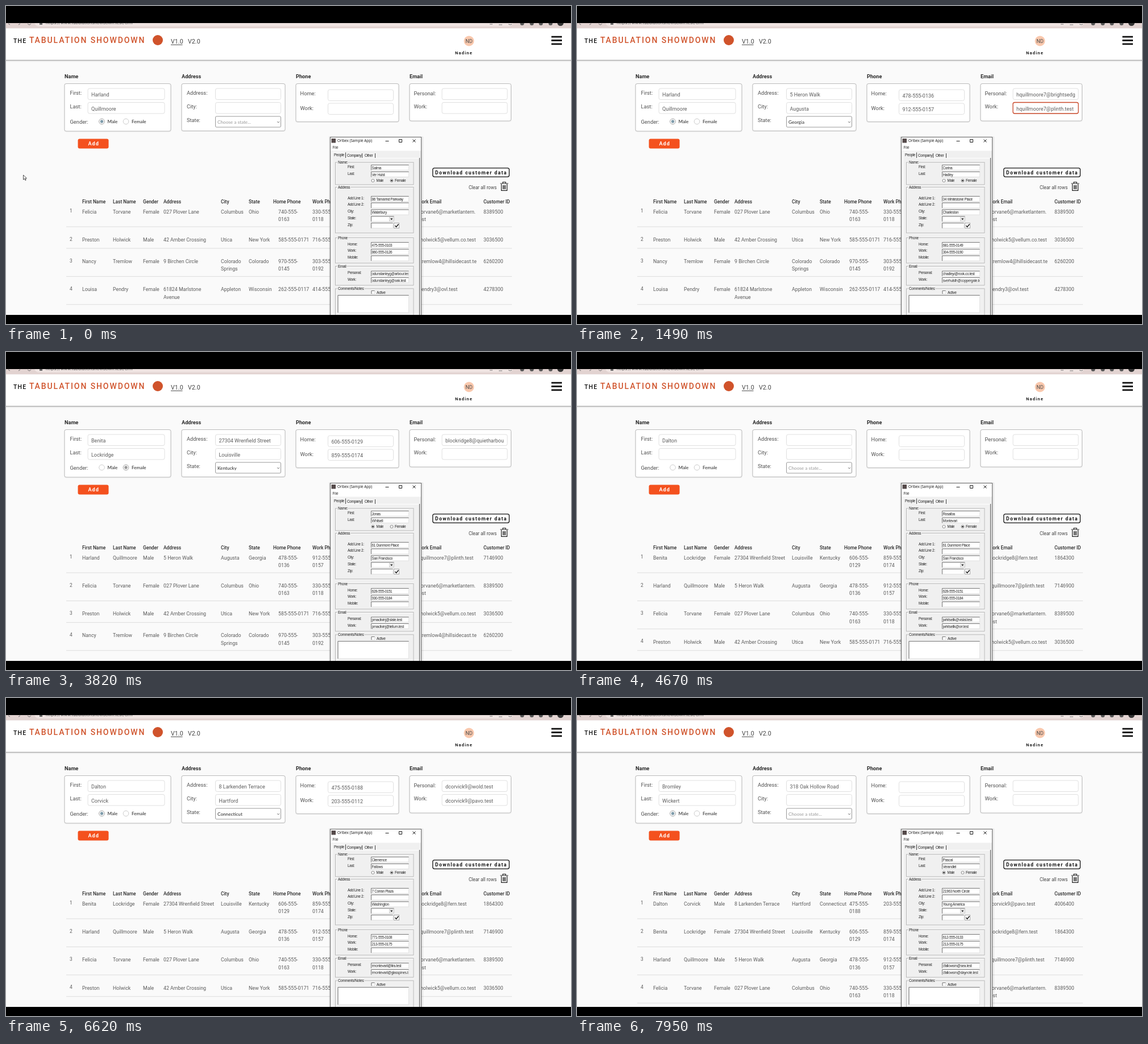
These frames come from a looping animation (994 px wide and 559 px high, 8 s). An HTML page:

```html
<!DOCTYPE html>
<html lang="en">
<head>
<meta charset="utf-8">
<title>Form filling</title>
<style>
html, body { margin: 0; width: 100%; height: 100%; overflow: hidden; background: #000; }
#stage { display: block; width: 100vw; height: 100vh; }
text { font: 9.2px Roboto, sans-serif; fill: #444; white-space: pre; }
.brand { font-size: 14px; font-weight: 500; letter-spacing: 1.9px; fill: #d0532b; }
.the { font-size: 10.5px; font-weight: 500; letter-spacing: 1.2px; fill: #111; }
.version { font-size: 10.7px; }
.user { font-size: 7.5px; font-weight: 600; letter-spacing: 1.2px; fill: #222; }
.section { font-size: 9.2px; font-weight: 600; fill: #2a2a2a; }
.label { font-size: 9.3px; fill: #505050; }
.value { font-size: 9px; fill: #5c5c5c; }
.lato { font: 8.2px Lato, sans-serif; fill: #222; }
.hint { fill: #999; }
.add { font-size: 9px; font-weight: 700; letter-spacing: 1px; fill: #fff; }
.download { font-size: 8.6px; font-weight: 600; letter-spacing: 1.4px; fill: #111; }
.clear { font-size: 8.2px; }
.head { font-size: 8.4px; font-weight: 500; fill: #2a2a2a; }
.cell { font-size: 8.8px; fill: #5c5c5c; }
.num { font-size: 8.4px; fill: #5c5c5c; }
.title { font: 6.4px "Open Sans", sans-serif; fill: #111; }
.app { font: 6.4px "Liberation Sans", sans-serif; letter-spacing: -.33px; fill: #222; }
.url { font-size: 8px; fill: #555; }
</style>
</head>
<body>
<svg id="stage" viewBox="0 0 994 559" preserveAspectRatio="none">
  <g id="page"></g>
  <g id="pageData"></g>
  <g id="app"></g>
  <g id="appData"></g>
  <path d="M0 0H994V30H0zM0 543H994V559H0z"/>
</svg>
<script>
const LOOP = 8000;
const $ = id => document.getElementById(id);

const text = (x, y, s, cls, more = '') => `<text x="${x}" y="${y}" class="${cls}" ${more}>${s}</text>`;
const rect = (x, y, w, h, fill, stroke = 'none', r = 0, sw = 1) =>
  `<rect x="${x}" y="${y}" width="${w}" height="${h}" rx="${r}" fill="${fill}" stroke="${stroke}" stroke-width="${sw}"/>`;
const line = (d, stroke, w = 1) => `<path d="${d}" fill="none" stroke="${stroke}" stroke-width="${w}"/>`;
const dot = (x, y, r, fill, stroke = 'none') => `<circle cx="${x}" cy="${y}" r="${r}" fill="${fill}" stroke="${stroke}"/>`;
const clipped = (x, y, w, s, cls) => `<svg x="${x}" y="${y - 10}" width="${w}" height="14">${text(0, 10, s, cls)}</svg>`;

// first, last, gender, address, city, state, home, work, work mail, id, personal mail; | breaks a table line
const customers = [
  ['Louisa', 'Pendry', 'Female', '61824 Marlstone|Avenue', 'Appleton', 'Wisconsin', '262-555-0117', '414-555-0139', 'lpendry3@ovl.test', '4278300'],
  ['Nancy', 'Tremlow', 'Female', '9 Birchen Circle', 'Colorado|Springs', 'Colorado', '970-555-|0145', '303-555-|0192', 'ntremlow4@hillsidecast.te|st', '6260200'],
  ['Preston', 'Holwick', 'Male', '42 Amber Crossing', 'Utica', 'New York', '585-555-0171', '716-555-0114', 'pholwick5@vellum.co.test', '3036500'],
  ['Felicia', 'Torvane', 'Female', '027 Plover Lane', 'Columbus', 'Ohio', '740-555-|0163', '330-555-|0118', 'ftorvane6@marketlantern.|test', '8389500'],
  ['Harland', 'Quillmoore', 'Male', '5 Heron Walk', 'Augusta', 'Georgia', '478-555-|0136', '912-555-|0157', 'hquillmoore7@plinth.test', '7146900', 'hquillmoore7@brightsedge.test'],
  ['Benita', 'Lockridge', 'Female', '27304 Wrenfield Street', 'Louisville', 'Kentucky', '606-555-|0129', '859-555-|0174', 'blockridge8@fern.test', '1864300', 'blockridge8@quietharbour.test'],
  ['Dalton', 'Corvick', 'Male', '8 Larkenden Terrace', 'Hartford', 'Connecticut', '475-555-|0188', '203-555-0112', 'dcorvick9@pavo.test', '4006400', 'dcorvick9@wold.test'],
  ['Bromley', 'Wickert', 'Male', '318 Oak Hollow Road'],
];
// Times at which each form field is set, in the order of formFields, for customers 4 to 7
const formFields = [0, 1, 2, 3, 4, 5, 6, 7, 10, 8];
const forms = [
  { start: 0, at: [0, 0, 0, 240, 470, 700, 1020, 1180, 1300, 1410] },
  { start: 1810, at: [2120, 2330, 2560, 2790, 3030, 3360, 3500, 3580, 3650, 3970] },
  { start: 4390, at: [4670, 4920, 5040, 5280, 5600, 5760, 5920, 6080, 6160, 6450] },
  { start: 6850, at: [7170, 7270, 7500, 7880] },
];

// first, last, gender, address, city, home, work, personal mail, work mail
const contacts = [
  { at: [0, 0, 0, 0, 0, 0, 0, 80, 230], data: ['Salma', 'Ver Hulst', 'F', '86 Tamarind Parkway', 'Waterbury', '475-555-0103', '860-555-0126', 'sverhulsth@plum.test', 'sverhulsth@coppergate.test'] },
  { at: [400, 560, 640, 870, 1020, 1180, 1300, 1410, 1570], data: ['Corina', 'Hadley', 'F', '04 Whitestone Place', 'Charleston', '681-555-0149', '304-555-0190', 'chadleyi@rook.co.test', 'chadleyi@q.test'] },
  { at: [1720, 1890, 1890, 2120, 2330, 2560, 2640, 2790, 2870], data: ['Petra', 'MacIlvin', 'F', '30718 Lena Drive', 'Shawnee Mission', '913-555-0120', '785-555-0166', 'pmacilvinj@slate.test', 'pmacilvinj@tellum.test'] },
  { at: [3030, 3360, 3420, 3500, 3580, 3650, 3820, 3970, 4130], data: ['Jonas', 'Whitsell', 'M', '61 Dunmore Place', 'San Francisco', '628-555-0151', '930-555-0184', 'jwhitsellk@vistal.test', 'jwhitsellk@orr.test'] },
  { at: [4300, 4450, 4550, 4920, 5040, 5130, 5280, 5450, 5600], data: ['Rosalba', 'Montevari', 'F', '2790 Fairhollow Court', 'Phoenix', '480-555-0122', '623-555-0169', 'rmontevaril@lira.test', 'rmontevaril@glasspines.test'] },
  { at: [5760, 5920, 5920, 6080, 6160, 6450, 6550, 6700, 6850], data: ['Clemence', 'Fallows', 'F', '7 Corran Plaza', 'Washington', '771-555-0108', '213-555-0175', 'cfallowsm@sea.test', 'cfallowsm@daynote.test'] },
  { at: [7000, 7170, 7270, 7400, 7630, 7880], data: ['Pascal', 'Verandiel', 'M', '21963 North Circle', 'Young America', '612-555-0133'] },
];
const firstMails = { 7: 'odunstanleyg@arbour.test', 8: 'odunstanleyg@oak.test' };

const inputs = {
  0: [144, 145, 135], 1: [144, 169.5, 135],
  3: [368.5, 145, 115], 4: [368.5, 169.5, 115],
  6: [566.5, 147, 115], 7: [566.5, 171, 115],
  10: [767, 145, 115], 8: [767, 169.5, 115],
};
const columns = [134, 188, 241, 277, 378, 427, 479, 539, 724, 840];
const appTops = { 0: 279.5, 1: 291.5, 3: 334.5, 4: 358, 5: 415.5, 6: 427.5, 7: 466, 8: 477.5 };

function drawPage() {
  let s = rect(0, 30, 994, 513, '#fafafa') + rect(0, 30, 994, 9.5, '#e2d3d1') + rect(50, 20, 842, 16, '#eee3e1', 'none', 8)
    + text(70, 32, 'https://www.tabulationshowdown.test/crm', 'url')
    + line('M4 31l3 2M22 33l3 -2M38 31q3 4 6 0', '#666') + rect(59, 28, 5, 5, '#666')
    + line('M851 32h5M867 33h6M884 32l3 1 3 -1', '#777');
  for (const x of [908, 925, 941, 958]) s += dot(x, 30.5, 3.5, '#555');
  s += dot(975.5, 29.5, 5.5, '#333');
  // header
  s += rect(0, 39.5, 994, 56, '#fff') + line('M0 95.5H994', '#aaa', 1.3) + line('M0 97H994', '#e6e6e6', 1.5)
    + text(13, 64.5, 'THE', 'the') + text(41, 65, 'TABULATION SHOWDOWN', 'brand') + dot(267, 60, 9, '#d0532b')
    + text(290, 66, 'V1.0', 'version') + line('M290 68.2H310.5', '#444') + text(320, 66, 'V2.0', 'version')
    + dot(814.5, 61.5, 9, '#f9c8ad') + text(814.5, 64.7, 'ND', 'label', 'text-anchor="middle"') + text(790, 85, 'Nadine', 'user')
    + line('M959.5 54.2H978M959.5 60.5H978M959.5 66.8H978', '#111', 2.8);
  // form panels
  for (const [x, w, h, name] of [[103, 187, 83.5, 'Name'], [309, 182, 83, 'Address'], [510, 181, 67, 'Phone'], [710, 178.5, 65.5, 'Email']])
    s += text(x, 126.5, name, 'section') + rect(x, 137, w, h, 'none', '#ececec', 3, 2) + rect(x, 136.5, w, h, '#fff', '#bbb', 3);
  for (const [x, y, name] of [[112.5, 156, 'First:'], [112.5, 180, 'Last:'], [112.5, 207, 'Gender:'],
    [318, 156, 'Address:'], [318, 180, 'City:'], [318, 204, 'State:'],
    [517.5, 157, 'Home:'], [517.5, 183, 'Work:'], [717.5, 157, 'Personal:'], [717.5, 180, 'Work:']])
    s += text(x, y, name, 'label');
  for (const [x, y, w] of Object.values(inputs)) s += rect(x, y, w, 19.5, '#fff', '#e0e0e0', 3);
  s += rect(368.5, 194, 115, 19, '#fff', '#999', 2) + line('M477 203l2 2 2 -2', '#777')
    + dot(168.5, 203, 4.8, '#fff', '#ccc') + dot(211, 203, 4.8, '#fff', '#ccc')
    + text(178.5, 206, 'Male', 'lato') + text(221, 206, 'Female', 'lato')
    + rect(126.5, 233.5, 54, 17, '#f4511e', 'none', 3) + text(144.5, 245, 'Add', 'add')
    + rect(750.8, 284.8, 134.5, 15.5, '#fff', '#111', 3, 1.3) + text(755, 296, 'Download customer data', 'download')
    + text(814, 322, 'Clear all rows', 'clear')
    + line('M869.5 312H883.5M874 311.5V309.5H879V311.5M871.5 313V324.3H881.5V313M874.5 315V322M876.5 315V322M878.5 315V322', '#222', 1.2);
  const heads = ['First Name', 'Last Name', 'Gender', 'Address', 'City', 'State', 'Home Phone', 'Work Phone', 'Work Email', 'Customer ID'];
  heads.forEach((h, i) => s += text(i === 6 ? 470 : columns[i], 347, h, 'head'));
  return s;
}

const sunken = (x, y, w, h) => rect(x, y, w, h, '#fff', '#ddd', 0, .8) + line(`M${x} ${y + h}V${y}H${x + w}`, '#777');

function drawApp() {
  let s = rect(569.5, 231, 163, 320, 'none', '#00000014', 0, 3) + rect(570.5, 230.5, 160, 330, '#f0f0f0', '#666')
    + rect(571, 231, 159, 23.5, '#fff') + rect(572.5, 233, 7.5, 7.5, '#554a4a')
    + text(583, 239.3, 'Orlbex (Sample App)', 'title') + text(574.5, 251, 'File', 'title')
    + line('M667.5 237.5H673.5M691.5 234.5H696.5V239.5H691.5zM715.5 234.5l5 5M720.5 234.5l-5 5', '#222')
    + text(577, 264, 'People', 'app') + text(600, 264.5, 'Company', 'app') + text(631, 264.5, 'Other', 'app')
    + line('M597.5 257.5V267M626.5 259V267M649.5 259V267', '#444')
    + line('M574 543V257H596M598 267.5H727', '#fff') + line('M727.5 267V543', '#666', 1.2);
  for (const [y, h, name, w] of [[275, 39, 'Name:', 19], [318.5, 80.5, 'Address', 24], [407.5, 44.5, 'Phone', 19], [457.5, 33.5, 'Email', 17], [497, 60, 'Comments/Notes:', 48]])
    s += rect(580, y + 1, 137.5, h, 'none', '#fff') + rect(579.5, y, 137.5, h, 'none', '#b4b4b4')
      + rect(582.5, y - 2, w, 4, '#f0f0f0') + text(584, y + 2.3, name, 'app');
  for (const [y, name] of [[285, 'First:'], [296.5, 'Last:'], [340, 'Add Line 1:'], [351.3, 'Add Line 2:'], [363, 'City:'], [374.7, 'State:'], [386.5, 'Zip:'],
    [421, 'Home:'], [432.3, 'Work:'], [443.7, 'Mobile:'], [471.3, 'Personal:'], [482.5, 'Work:']])
    s += text(601, y, name, 'app');
  for (const y of [...Object.values(appTops), 346, 439]) s += sunken(642.5, y, 66, 9);
  return s + sunken(642.5, 369.8, 40, 9) + rect(674.5, 371, 8, 7, '#eee', '#bbb', 0, .6) + '<path d="M676 373.5h4.5l-2.25 2.6z"/>'
    + sunken(642.5, 381.5, 38, 9) + rect(682.5, 381.5, 9, 9, '#fff', '#aaa') + line('M684.5 386l2 2.5 4 -5', '#111', 1.4)
    + dot(645.5, 307, 2.5, '#fff', '#888') + dot(678.5, 307, 2.5, '#fff', '#888')
    + text(651.5, 309.4, 'Male', 'app') + text(684, 309.4, 'Female', 'app')
    + sunken(643, 500.5, 5.5, 5.5) + text(652, 505.7, 'Active', 'app') + sunken(584, 508.5, 124.5, 30.5);
}

function drawForm(t, index) {
  const { at } = forms[index], customer = customers[4 + index];
  const isSet = field => t >= at[formFields.indexOf(field)];
  let s = '';
  for (const field in inputs) {
    if (!isSet(+field)) continue;
    const [x, y, w] = inputs[field];
    if (field == 8 && t < at[9] + 150) s += rect(x, y, w, 19.5, '#fff', '#c9482a', 3, 1.3);
    s += clipped(x + 6, y + 14, w - 12, customer[field].replace('|', ''), 'value');
  }
  if (isSet(2)) {
    const male = customer[2] === 'Male', x = male ? 168.5 : 211;
    s += dot(x, 203, 4.8, '#fff', '#aaa') + dot(x, 203, 2.7, male ? '#7f9cab' : '#999');
  }
  return s + (isSet(5) ? text(372, 206.7, customer[5], 'lato') : text(372, 206.7, 'Choose a state...', 'lato hint'));
}

function drawTable(index) {
  let s = '', top = 338.6;
  for (let row = 0; row < 4; row++) {
    const customer = customers[3 + index - row].slice(0, 10);
    s += text(112, top + 24.5, row + 1, 'num');
    customer.forEach((value, i) => value.split('|').forEach((part, n) =>
      s += text(columns[i], top + 25.9 + 13.3 * n, part, 'cell')));
    top += customer.some(value => value.includes('|')) ? 49.4 : 38;
    s += line(`M106 ${top}H890`, '#ddd');
  }
  return s;
}

function drawContact(t) {
  const latest = i => {
    const contact = contacts.findLast(c => t >= c.at[i]);
    return contact ? contact.data[i] : firstMails[i];
  };
  let s = dot(latest(2) === 'M' ? 645.5 : 678.5, 307, 1.3, '#111');
  for (const i in appTops) s += clipped(643.5, appTops[i] + 7, 64.5, latest(+i), 'app');
  return s;
}

const shown = {};
function update(id, markup) {
  if (shown[id] !== markup) $(id).innerHTML = shown[id] = markup;
}

function frame() {
  const t = performance.now() % LOOP;
  const index = forms.findLastIndex(f => t >= f.start);
  const pointer = t < 80 ? '<path d="M30.5 297v8.3l2-1.8 1.4 3 1.3-.6-1.4-2.9h2.6z" fill="#fff" stroke="#222" stroke-width=".8"/>' : '';
  update('pageData', drawForm(t, index) + drawTable(index) + pointer);
  update('appData', drawContact(t));
  requestAnimationFrame(frame);
}

$('page').innerHTML = drawPage();
$('app').innerHTML = drawApp();
frame();
</script>
</body>
</html>
```
